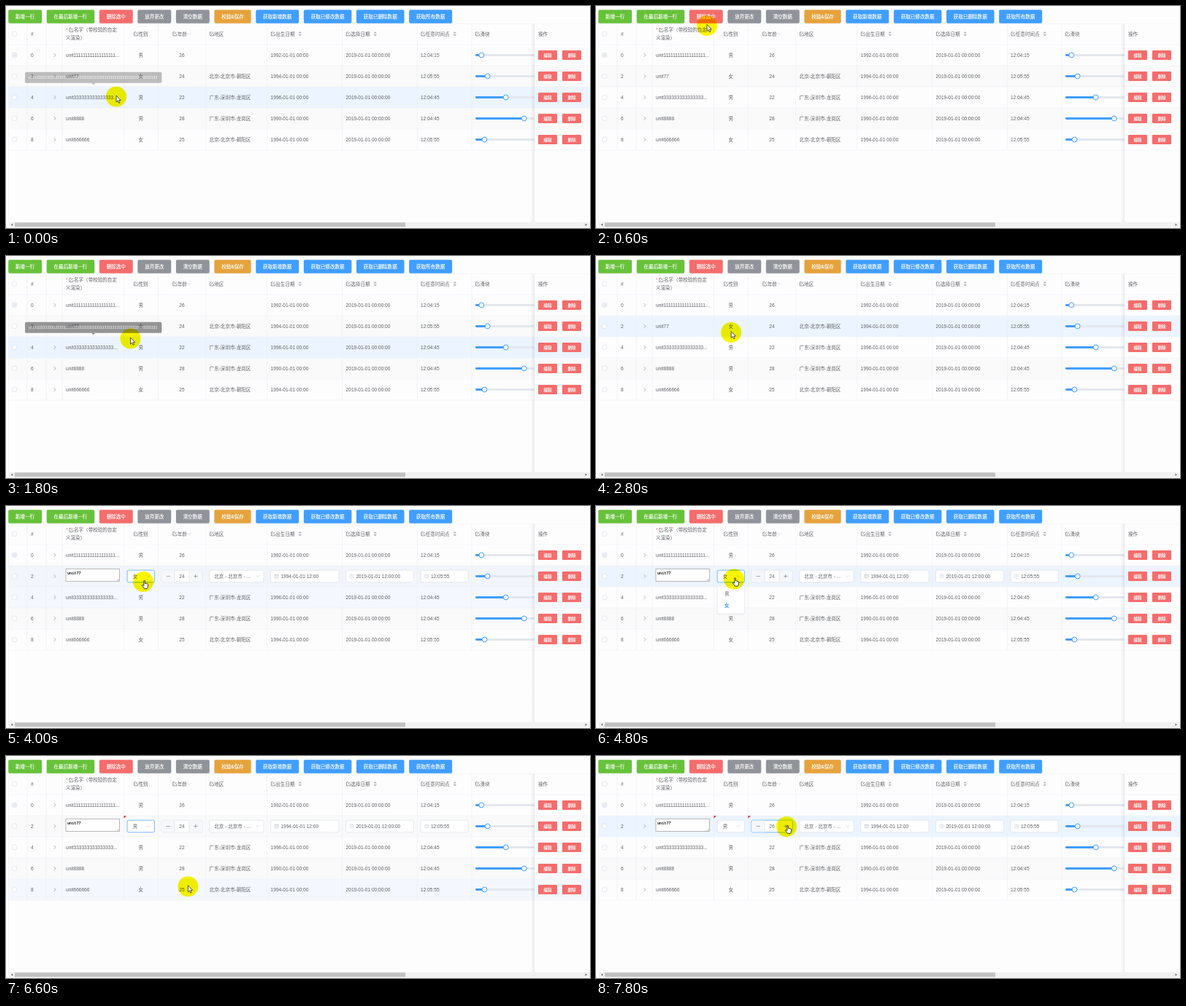
An HTML page for the animation above (8000 ms loop, 800 by 305 pixels).

```html
<!DOCTYPE html>
<html lang="zh-CN">
<head>
<meta charset="utf-8">
<title>Editable table</title>
<style>
html, body { margin: 0; width: 100%; height: 100%; overflow: hidden; background: #fefdfe; }
svg { display: block; width: 100vw; height: 100vh; }
text { font: 6.55px "Liberation Sans", "Noto Sans CJK SC", "Noto Sans CJK", sans-serif; fill: #606266; white-space: pre; }
.mono { font-family: "Liberation Mono", monospace; }
.label { fill: #fff; stroke: #fff; stroke-width: .15px; }
.small { font-size: 5.6px; }
</style>
</head>
<body>
<svg id="stage" viewBox="0 0 800 305" xmlns="http://www.w3.org/2000/svg"></svg>
<script>
const LOOP = 8000, STEP = 200;
const BLUE = '#409eff', RED = '#f56c6c', GREEN = '#67c23a', GRAY = '#909399', ORANGE = '#e6a23c';
const LINE = '#ebeef5', BORDER = '#dcdfe6', PALE = '#c0c4cc', INK = '#606266', PAPER = '#fefdfe';
const EM = 6.55, PAD = 4.8, TOP = 53, ROW = 29;

const BUTTONS = [[GREEN, '新增一行'], [GREEN, '在最后新增一行'], [RED, '删除选中'], [GRAY, '放弃更改'],
  [GRAY, '清空数据'], [ORANGE, '校验&保存'], [BLUE, '获取新增数据'], [BLUE, '获取已修改数据'],
  [BLUE, '获取已删除数据'], [BLUE, '获取所有数据']];
const LEFT = { index: 29, expand: 55, name: 77, gender: 161.3, age: 208.2, area: 273.8,
  birth: 357.8, day: 460.8, time: 563.3, slider: 638, fixed: 724 };
const KEYS = Object.keys(LEFT);
const HEADS = { gender: '性别', age: '年龄', area: '地区', birth: '出生日期', day: '选择日期',
  time: '任意时间点', slider: '滑块' };
const BEIJING = '北京-北京市-朝阳区', SHENZHEN = '广东-深圳市-龙岗区';
const ROWS = [
  ['unit' + '1'.repeat(18) + '...', '男', 26, '', '1992', '12:04:15', 10],
  ['unit77', '女', 24, BEIJING, '1994', '12:05:55', 20],
  ['unit' + '3'.repeat(15) + '...', '男', 22, SHENZHEN, '1996', '12:04:45', 50],
  ['unit8888', '男', 28, SHENZHEN, '1990', '12:04:45', 80],
  ['unit666666', '女', 25, BEIJING, '1994', '12:05:55', 15]];

// Pointer stops: [time, x, y], eased in between
const STOPS = [[0, 151, 124.5], [600, 152, 27], [1000, 156, 122], [2600, 185, 105], [3600, 186, 105],
  [3800, 188, 113], [4000, 188, 104], [4800, 189, 100.5], [5200, 185, 121], [5800, 243, 224],
  [6200, 243, 224], [7200, 261, 97], [LOOP, 261, 97]];

const within = (t, from, to) => t >= from && t < to;
const ramp = (t, from, to) => Math.min(1, Math.max(0, (t - from) / (to - from)));
function pointerAt(t) {
  const i = STOPS.findIndex(stop => stop[0] > t);
  const [a, b] = [STOPS[i - 1], STOPS[i]];
  const u = ramp(t, a[0], b[0]), ease = u * u * (3 - 2 * u);
  return [a[1] + (b[1] - a[1]) * ease, a[2] + (b[2] - a[2]) * ease];
}
const rowUnder = t => Math.floor((pointerAt(Math.max(0, t))[1] - TOP) / ROW);

function stateAt(t) {
  return {
    t,
    editing: t >= 3200,
    gender: t < 5200 ? '女' : '男',
    age: 24 + (t >= 7400) + (t >= 7600),
    tip: .3 * (1 - ramp(t, 0, 200)) + ramp(t, 800, 1200) - ramp(t, 1600, 2000),
    menu: ramp(t, 4200, 4600) - ramp(t, 5000, 5400),
    click: within(t, 3000, 3200) || within(t, 5800, 6200),
    shape: within(t, 1000, 1600) ? 'beam' : within(t, 3400, 5400) || t >= 6800 ? 'hand' : 'arrow',
    hover: i => ((rowUnder(t) === i) + (rowUnder(t - STEP) === i)) / 2
  };
}

const text = (x, mid, s, extra = '') => `<text x="${x}" y="${mid + 2.4}" ${extra}>${s}</text>`;
const centered = (x, mid, s, extra = '') => text(x, mid, s, 'text-anchor="middle" ' + extra);
const rect = (x, y, w, h, color, extra = '') =>
  `<rect x="${x}" y="${y}" width="${w}" height="${h}" fill="${color}" ${extra}/>`;
const stroke = (d, color, w = .6) => `<path d="${d}" fill="none" stroke="${color}" stroke-width="${w}"/>`;
const fill = (d, color, extra = '') => `<path d="${d}" fill="${color}" ${extra}/>`;
const circle = (x, y, r, extra) => `<circle cx="${x}" cy="${y}" r="${r}" ${extra}/>`;
const box = (x, y, w, h, border = BORDER, bg = '#fff') =>
  rect(x, y, w, h, bg, `rx="1.8" stroke="${border}" stroke-width=".7"`);
const caret = (x, y) => stroke(`M${x - 2.3} ${y - 1.1}l2.3 2.3l2.3 -2.3`, PALE);
const rowMid = i => TOP + ROW * (i + .5);
const nextEdge = key => LEFT[KEYS[KEYS.indexOf(key) + 1]];
const middle = key => (LEFT[key] + nextEdge(key)) / 2;
const start = key => LEFT[key] + PAD;

const pencil = (x, y) =>
  stroke(`M${x + 3.4} ${y - 2.4}h-2.9v5h5v-2.6M${x + 2.2} ${y + .8}l3.3 -3.4`, INK, .65);
const checkbox = (y, off) => box(8.6, y - 3.2, 6.2, 6.2, BORDER, off ? '#edf2fc' : '#fff') +
  (off ? stroke(`M10.1 ${y}l1.3 1.3l2 -2.7`, PALE) : '');

function toolbar() {
  let x = 3.2;
  return BUTTONS.map(([color, label]) => {
    const w = label.replace('&', '').length * EM + (label.includes('&') ? 4.4 : 0) + 19.7;
    const s = rect(x, 5.2, w, 18.5, color, 'rx="1.8"') +
      centered(x + w / 2, 14.6, label.replace('&', '&amp;'), 'class="label"');
    x += w + 6.6;
    return s;
  }).join('');
}

function header() {
  const y = 38.3;
  let s = checkbox(y) + text(34, y, '#') + text(82, 33, '*', `style="fill:${RED}"`) + pencil(86.3, 33) +
    text(93, 33, '名字（带校验的自定') + text(82, 44, '义渲染）');
  for (const [key, label] of Object.entries(HEADS)) {
    const w = label.length * EM + 6.4;
    const x = key === 'gender' ? middle(key) - w / 2 : key === 'age' ? middle(key) - w / 2 - 3 : start(key) + .3;
    s += pencil(x, y) + text(x + 6.4, y, label);
    if (key === 'age') s += caret(x + w + 3.6, y);
    if (label.length > 3) {
      const m = x + w + 7.2;
      s += fill(`M${m - 2.3} ${y - .8}h4.6l-2.3 -2.4zM${m - 2.3} ${y + .8}h4.6l-2.3 2.4z`, '#b0b4bc');
    }
  }
  return s;
}

function stripes(x, state) {
  let s = '';
  ROWS.forEach((_, i) => {
    const y = TOP + ROW * i;
    if (i % 2) s += rect(x, y, 800 - x, ROW, '#fafafa');
    s += rect(x, y, 800 - x, ROW, '#ebf4ff', `opacity="${state.hover(i)}"`);
  });
  for (let i = 0; i <= ROWS.length; i++) s += rect(x, TOP + ROW * i - .3, 800 - x, .6, LINE);
  return s;
}

function grid(state) {
  return stripes(3.5, state) +
    Object.values(LEFT).map(x => rect(x - .3, 24.5, .6, 173.5, LINE)).join('') +
    rect(3.2, 24.2, 797, .6, LINE) + rect(3.2, 24.2, .6, 273, LINE);
}

function slider(value, y) {
  const x = start('slider') + .2, length = .835 * value;
  return rect(x, y - 1.4, 85, 2.8, '#e4e7ed', 'rx="1.4"') + rect(x, y - 1.4, length, 2.8, BLUE, 'rx="1.4"') +
    circle(x + length, y, 3.4, `fill="#fff" stroke="${BLUE}"`);
}

function dataRow([name, gender, age, area, year, time, value], i, editing) {
  const y = rowMid(i);
  const s = checkbox(y, i === 0) + text(34, y, 2 * i) +
    stroke(`M65.8 ${y - 2.3}l2.2 2.3l-2.2 2.3`, '#777') + slider(value, y);
  if (editing) return s;
  return s + text(82, y, name) + centered(middle('gender'), y, gender) + centered(middle('age'), y, age) +
    text(start('area'), y, area) + text(start('birth'), y, year + '-01-01 00:00') +
    text(start('day'), y, '2019-01-01 00:00:00') + text(start('time'), y, time);
}

function fixedColumn(state) {
  const x = LEFT.fixed;
  const action = (left, y, label) => rect(left, y - 6.5, 26, 13, RED, 'rx="1.3"') +
    centered(left + 13, y - .3, label, 'class="label small"');
  return rect(x - 5.5, 25, 5.5, 272, 'url(#shade)') + rect(x, 24.6, 76, 272.4, PAPER) + stripes(x, state) +
    text(x + 5, 38.3, '操作') +
    ROWS.map((_, i) => action(x + 5, rowMid(i), '编辑') + action(x + 38, rowMid(i), '删除')).join('');
}

function scrollbar() {
  return rect(4, 297, 796, 7, '#f1f1f1') + rect(12, 297.5, 535, 6, '#c1c1c1') +
    fill('M9.2 298.7v3.6l-2.2 -1.8z', INK) + fill('M793.6 298.7v3.6l2.2 -1.8z', INK);
}

const clock = (x, y) => circle(x, y, 2.6, `fill="none" stroke="${PALE}" stroke-width=".6"`) +
  stroke(`M${x} ${y - 1.6}v1.8h1.4`, PALE);
const calendar = (x, y) => stroke(`M${x - 2.5} ${y - 2.3}h5v4.8h-5zm0 1.6h5` +
  `M${x - 1.2} ${y - 3.1}v1.4m2.4 -1.4v1.4M${x - 1.3} ${y + .9}h2.6`, PALE);
const flag = key => fill(`M${LEFT[key] + .2} 82.2h3.4l-3.4 3.4z`, '#d01818');

function editor({ t, gender, age }) {
  const y = rowMid(1), top = y - 8.3, h = 16.6, onAge = t >= 7000;
  const field = (key, focused) =>
    box(start(key), top, nextEdge(key) - LEFT[key] - 2 * PAD, h, focused ? BLUE : BORDER);
  const picker = (key, icon, value) =>
    field(key) + icon(start(key) + 7.9, y) + text(start(key) + 13.8, y, value);
  const a = start('age'), b = nextEdge('age') - PAD, side = 18;
  return rect(82, 86.3, 73.5, 17.2, '#fff', 'stroke="#9a9a9a" stroke-width=".7"') +
    text(84, 91.2, 'unit77', 'class="mono" style="font-size:5.2px;font-weight:700;fill:#111"') +
    stroke('M151.5 103l3.2 -3.2m-1.5 3.2l1.5 -1.5', '#888', .5) +
    field('gender', t >= 3400 && !onAge) + text(start('gender') + 7.6, y, gender) + caret(195, y) +
    field('age', onAge) + rect(a + .4, top + .4, side, h - .8, '#f5f7fa') +
    rect(b - side - .4, top + .4, side, h - .8, '#f5f7fa') +
    stroke(`M${a + side} ${top}v${h}M${b - side} ${top}v${h}`, BORDER) +
    stroke(`M${a + 6.5} ${y}h5.4M${b - 12} ${y}h5.4m-2.7 -2.7v5.4`, '#73767a') +
    centered(middle('age'), y, age) +
    field('area') + text(start('area') + 6.7, y, '北京 - 北京市 - ...') + caret(345, y) +
    picker('birth', calendar, '1994-01-01 12:00') + picker('day', clock, '2019-01-01 12:00:00') +
    picker('time', clock, '12:05:55') +
    (gender === '男' ? flag('gender') : '') + (age > 24 ? flag('age') : '');
}

function dropdown({ menu, gender }) {
  const x = start('gender');
  const option = (s, y) => text(x + 10, y, s, s === gender ? `style="fill:${BLUE};font-weight:700"` : '');
  return `<g opacity="${menu}" transform="translate(0 ${110 * (1 - menu)}) scale(1 ${menu})">` +
    rect(x - .7, 110.5, 38.6, 39, '#000', 'rx="2" opacity=".05"') + box(x, 110, 37.3, 38, '#e4e7ed') +
    fill(`M${x + 15.4} 110.4l2.8 -2.8l2.8 2.8z`, '#fff') +
    stroke(`M${x + 15.4} 110l2.8 -2.8l2.8 2.8`, '#e4e7ed') + option('男', 120.8) + option('女', 136.8) + '</g>';
}

function tooltip({ tip }) {
  return `<g opacity="${tip}">` + rect(26, 90.7, 187.3, 15, '#303133', 'rx="1.8"') +
    fill('M116.8 105.6h5.6l-2.8 2.9z', '#303133') +
    text(31, 97.5, 'unit' + '3'.repeat(59), 'class="mono" style="font-size:4.68px;fill:#fff"') + '</g>';
}

const SHAPES = {
  arrow: fill('M0 -1.5V7.5L2.1 5.6L3.5 8.8L5 8.1L3.6 5.1H6.3Z', '#fff', 'stroke="#111" stroke-width=".7"'),
  beam: stroke('M-1.4 -4Q0 -4 0 -3V3Q0 4 -1.4 4M1.4 -4Q0 -4 0 -3M0 3Q0 4 1.4 4', '#222', .8),
  hand: fill('M.8 -1.5q1.2 -.8 1.5 .5v3.2l3.6 .9q1 .3 .8 1.5l-.6 3q-.2 1.3 -1 2h-3.7q-1 -2.2 -3.2 -4.2q.2 -1.4 1.6 -.6l1 .8z',
    '#fff', 'stroke="#111" stroke-width=".8"')
};
function cursor({ t, click, shape }) {
  const [x, y] = pointerAt(t);
  return circle(x, y, 14, 'fill="#fbf500" style="mix-blend-mode:multiply"') +
    (click ? circle(x, y, 2.9, 'fill="none" stroke="#c81e1e" stroke-width="1.5"') : '') +
    `<g transform="translate(${x} ${y})">${SHAPES[shape]}</g>`;
}

const stage = document.getElementById('stage');
const defs = '<defs><linearGradient id="shade"><stop stop-color="#000" stop-opacity="0"/>' +
  '<stop offset="1" stop-color="#000" stop-opacity=".07"/></linearGradient></defs>';
function draw(t) {
  const state = stateAt(t);
  stage.innerHTML = defs + rect(0, 0, 800, 305, PAPER) + toolbar() + grid(state) + header() +
    ROWS.map((row, i) => dataRow(row, i, state.editing && i === 1)).join('') +
    (state.editing ? editor(state) : '') + fixedColumn(state) + scrollbar() +
    (state.menu > 0 ? dropdown(state) : '') + (state.tip > 0 ? tooltip(state) : '') + cursor(state);
}

const began = performance.now();
let shown = -1;
function tick() {
  const t = Math.floor((performance.now() - began) % LOOP / STEP) * STEP;
  if (t !== shown) draw(shown = t);
  requestAnimationFrame(tick);
}
tick();
</script>
</body>
</html>
```
